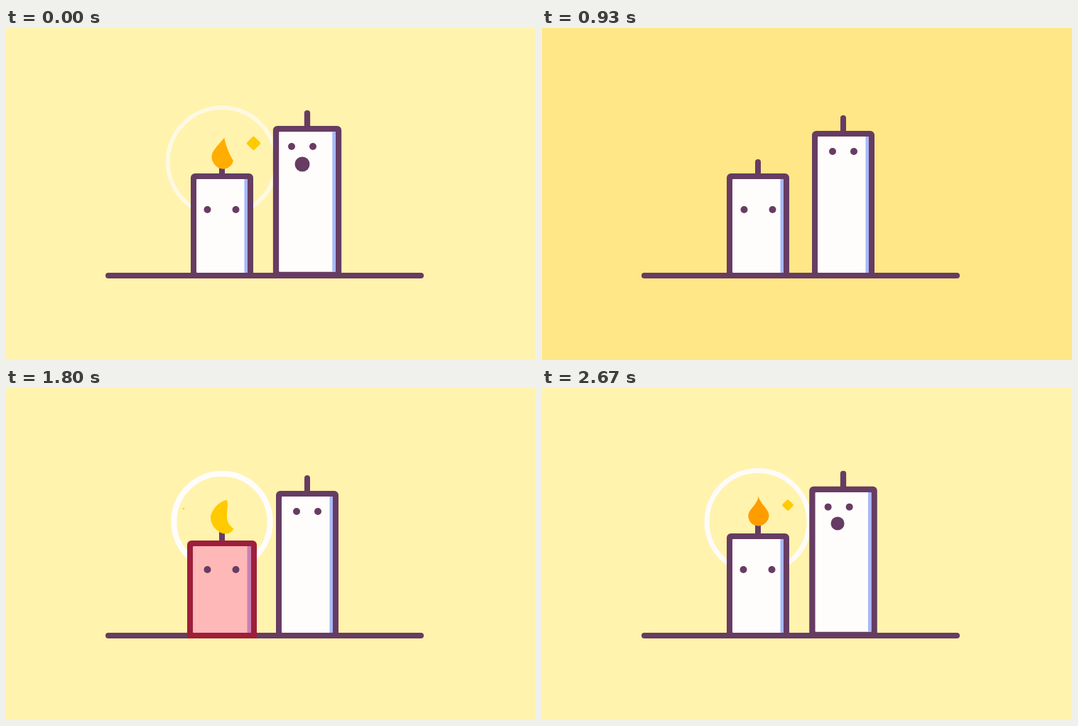
Recreate the animation shown at these times as an HTML page with a canvas. Size 746x468 px, loop 2.7 s.

```html
<!DOCTYPE html>
<html lang="en">
<head>
<meta charset="utf-8">
<title>Candles</title>
<style>
  html, body { margin: 0; width: 100%; height: 100%; overflow: hidden; }
  canvas { display: block; width: 100%; height: 100%; }
</style>
</head>
<body>
<canvas id="stage" width="746" height="468"></canvas>
<script>
const ctx = document.getElementById('stage').getContext('2d');
const LOOP = 2700;

// Start of each act within the loop, and lengths, in ms
const LIGHT_ON = 1780, LIT_TIME = 1320, WAVE_TIME = 1260, WAVE_PERIOD = 210;
const INHALE = 2385, INHALE_TIME = 315, BLOW = 415;
const SWAY_PERIOD = 496, SPARKLE_PERIOD = 270, SPARKLE_TIME = 250;

const PLUM = [103, 60, 99], RUBY = [158, 30, 60];
const WAX = [255, 252, 252], BLUSH = [255, 184, 184];
const SHADE = [168, 184, 248], MAUVE = [201, 128, 180];
const GOLD = [255, 202, 0], EMBER = [255, 106, 0];

// Flame outline around its centre: start point, then four cubic curves
const UPRIGHT = [0.5, -36, 2, -25, 15.5, -19, 15.5, -9, 15.5, -1, 8, 6, 0, 6,
  -8, 6, -13.5, 0, -13.5, -8, -13.5, -17, 0, -24, 0.5, -36];
const BENT = [7, -30, 11, -18, 0, -2, 16, 10, 16, 14, 9, 18, 4, 17.5,
  -6, 17, -16, 5, -16, -5, -16, -15, -4, -29, 7, -30];

const mix = (a, b, k) => a.map((v, i) => v + (b[i] - v) * k);
const rgb = c => `rgb(${c.map(Math.round).join()})`;
const ramp = (t, from, to) => Math.max(0, Math.min(1, (t - from) / (to - from)));
const since = (t, start) => (t - start + LOOP) % LOOP;

function box(x, y, w, h, radius, color) {
  ctx.fillStyle = rgb(color);
  ctx.beginPath();
  ctx.roundRect(x, y, w, h, radius);
  ctx.fill();
}

function dot(x, y, diameter) {
  ctx.fillStyle = rgb(PLUM);
  ctx.beginPath();
  ctx.arc(x, y, diameter / 2, 0, 7);
  ctx.fill();
}

function candle(center, width, top, bottom, edge, anger) {
  const left = center - width / 2, inner = width - 2 * edge, height = bottom - top - 2 * edge;
  const shade = 4.5 + anger;
  box(left, top, width, bottom - top, [6, 6, 2, 2], mix(PLUM, RUBY, anger));
  box(left + edge, top + edge, inner, height, 1, mix(WAX, BLUSH, Math.min(1, anger * 1.2)));
  box(left + edge + inner - shade, top + edge, shade, height, 0, mix(SHADE, MAUVE, anger));
}

function wave(age) {
  const step = (age - 20) % WAVE_PERIOD / 30;
  ctx.globalAlpha = Math.max(0, Math.min(1, 1.25 - step * .28));
  ctx.strokeStyle = rgb(WAX);
  ctx.lineWidth = 8 - step;
  ctx.beginPath();
  ctx.arc(304, 188.5, 67.5 + step * 4.3, 0, 7);
  ctx.stroke();
  ctx.globalAlpha = 1;
}

// The flame sways both ways, mirrored, and glows golden to the right
function flame(age) {
  const sway = Math.cos((age - 20) / SWAY_PERIOD * 2 * Math.PI);
  const [x, y, ...curve] = mix(UPRIGHT, BENT, Math.abs(sway));
  ctx.save();
  ctx.translate(304, 188);
  ctx.scale(sway < 0 ? -1 : 1, 1);
  ctx.fillStyle = rgb(mix(EMBER, GOLD, (sway + 1) / 2));
  ctx.beginPath();
  ctx.moveTo(x, y);
  for (let i = 0; i < curve.length; i += 6) ctx.bezierCurveTo(...curve.slice(i, i + 6));
  ctx.fill();
  ctx.restore();
}

// Four sparkles rise in turn, left and right
function sparkle(age) {
  const turn = Math.floor((age - 10) / SPARKLE_PERIOD);
  const k = (age - 10) % SPARKLE_PERIOD / SPARKLE_TIME;
  if (turn < 0 || turn > 3 || k >= 1) return;
  const size = 15.5 * Math.sin(Math.PI * k);
  const x = turn % 2 ? 340 + 21 * k : 251 - 21 * k;
  ctx.save();
  ctx.translate(x, 171 - 21 * k);
  ctx.rotate(Math.PI / 4);
  box(-size / 2, -size / 2, size, size, Math.min(2, size / 4), GOLD);
  ctx.restore();
}

function squint(x, y, direction) {
  ctx.strokeStyle = '#f8000d';
  ctx.lineWidth = 4;
  ctx.lineCap = ctx.lineJoin = 'round';
  ctx.beginPath();
  ctx.moveTo(x - 3 * direction, y - 6);
  ctx.lineTo(x + 3.5 * direction, y);
  ctx.lineTo(x - 3 * direction, y + 6);
  ctx.stroke();
}

function shortCandle(t, lit) {
  const anger = ramp(t, 1095, 1640) - ramp(t, 1810, 1900);
  const top = 205 + 10 * anger;
  box(300, top - 20, 8, 24, 4, lit ? PLUM : mix(PLUM, RUBY, anger));
  candle(304, 88 + 10 * anger, top, 353, 8, anger);
  if (!lit && anger > .05) {
    const y = 256 + 11 * anger;
    squint(280.5, y, 1);
    squint(322.5, y, -1);
  } else {
    const x = lit ? 283.5 : 284.5;
    dot(x, 256, 10);
    dot(x + 40, 256, 10);
  }
}

function tallCandle(t) {
  const age = since(t, INHALE), blow = Math.max(0, age - BLOW);
  const inhale = ramp(age, 0, INHALE_TIME);
  // Swell, then swing back and settle
  const swell = inhale * Math.cos(Math.PI * blow / 260) * (1 - ramp(blow, 260, 650));
  const effort = Math.abs(swell);
  const width = 88 + 8.3 * swell, top = 145 - 5 * swell - 2 * effort;
  const edge = 8 * Math.min(1.04, width / 88);
  const eyeX = 409 - 8 * effort + swell, eyeY = 174 - 4.6 * effort - 2.4 * swell;
  const mouth = 21 * inhale * (1 - ramp(blow, 0, 606)), drop = .83 * mouth - 2.4;

  box(424 - edge / 2, top - 22, edge, 26, 4, PLUM);
  candle(424, width, top, 353 - Math.max(0, swell), edge, 0);
  dot(eyeX, eyeY, 10);
  dot(eyeX + 30, eyeY, 10);
  dot(eyeX + drop, eyeY + drop + 10, mouth);
}

function draw(now) {
  const t = now % LOOP;
  const age = since(t, LIGHT_ON), lit = age < LIT_TIME;
  ctx.fillStyle = lit ? '#fff3ad' : '#ffe686';
  ctx.fillRect(0, 0, 746, 468);
  if (age < WAVE_TIME) wave(age);
  box(140, 345, 448, 8, 4, PLUM);
  shortCandle(t, lit);
  tallCandle(t);
  if (lit) {
    flame(age);
    sparkle(age);
  }
}

const begin = performance.now();
(function frame() {
  draw(performance.now() - begin);
  requestAnimationFrame(frame);
})();
</script>
</body>
</html>
```
